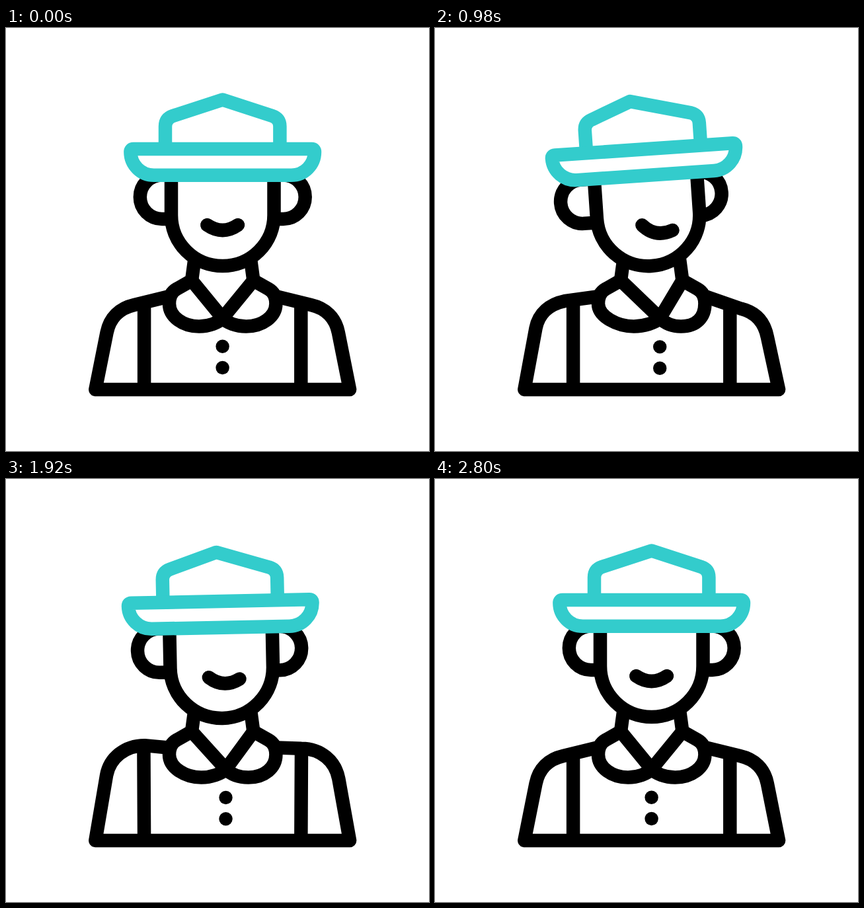
An HTML page that plays this animation: 640 by 640 pixels, repeating every 3.1 s.

```html
<!DOCTYPE html>
<html lang="en">
<head>
<meta charset="utf-8">
<title>Man in a hat</title>
<style>
html, body { margin: 0; height: 100%; overflow: hidden; background: #fff; }
svg { display: block; width: 100%; height: 100%; }
path, g { stroke-linejoin: round; }
</style>
</head>
<body>
<svg viewBox="0 0 640 640" fill="none" stroke="#000" stroke-width="20.5">
  <path id="body"/>
  <path id="straps"/>
  <path d="M286 345L281 382M369.4 345L374.4 382"/>
  <path id="collar"/>
  <g id="buttons" fill="#000" stroke="none">
    <circle cx="327.6" cy="481.7" r="10.2"/>
    <circle cx="327.6" cy="514" r="10.2"/>
  </g>
  <g id="head">
    <path id="earL" d="M256 289H236A33.2 33.2 0 0 1 236 222.6H256"/>
    <path id="earR" d="M399 289H419.5A33.2 33.2 0 0 0 419.5 222.6H399"/>
    <path fill="#fff" d="M250 215V283A77.75 77 0 0 0 405.5 283V215"/>
    <path id="smile" stroke-linecap="round" d="M304.3 298Q327.7 314 351 298"/>
    <g stroke="#33cccc" fill="#fff">
      <path id="crown"/>
      <path d="M192.9 183H462.5Q467 183 467 187.5A35.3 35.3 0 0 1 431.7 222.7H223.7A35.3 35.3 0 0 1 188.4 187.5Q188.4 183 192.9 183Z"/>
    </g>
  </g>
</svg>
<script>
const LOOP = 3100, MID = 327.7;
const $ = id => document.getElementById(id);
const set = (id, name, value) => $(id).setAttribute(name, value);

const smooth = (t, from, to) => {
  const u = Math.min(1, Math.max(0, (t - from) / (to - from)));
  return u * u * (3 - 2 * u);
};

// Ease with a long, soft landing: cubic-bezier(.33, 0, .15, 1)
function settle(t, from, to) {
  const x = Math.min(1, Math.max(0, (t - from) / (to - from)));
  let lo = 0, hi = 1;
  for (let i = 0; i < 24; i++) {
    const u = (lo + hi) / 2, v = 1 - u;
    if (.99 * v * v * u + .45 * v * u * u + u * u * u < x) lo = u; else hi = u;
  }
  return lo * lo * (3 - 2 * lo);
}

// side is -1 for left, 1 for right; x is the distance from the middle
const at = (side, x, y) => `${(MID + side * x).toFixed(2)} ${y.toFixed(2)} `;

function shoulder(side, lean, shrug) {
  const k = side * lean;
  return [
    at(side, 192.4, 547),
    at(side, 175.2 + .5 * shrug, 461 + 7 * k - 11.6 * shrug),
    at(side, 170.7, 438 + 7 * k - 16 * shrug),
    at(side, 155.7 - 9 * shrug + 2 * k, 424 + 6.5 * k - 21.5 * shrug),
    at(side, 133.7 - 17.5 * shrug + 2 * k, 419 + 6 * k - 15.7 * shrug),
    at(side, 82.5, 406.5)
  ];
}

function lobe(side, lean) {
  const tip = side * 13 * lean, low = side * 9 * lean;
  return "M" + at(side, 46.7, 382) + "L" + at(side, 69.7, 395) +
    "C" + at(side, 78.7, 400) + at(side, 80.7, 408) + at(side, 80.7, 417) +
    "C" + at(side, 80.7, 437) + at(side, 59.7 + low, 451.5) + at(side, 35.7 + low, 451.5) +
    "C" + at(side, 20 + low, 451.5) + at(side, 7 + tip, 446) + at(side, tip, 439) + "Z";
}

function strap(side, lean, shrug) {
  return "M" + at(side, 118.6 + .8 * shrug, 417 + 6 * side * lean - 10 * shrug) +
    "L" + at(side, 118.6, 547);
}

function draw(t) {
  const turn = settle(t, 0, 1240) - smooth(t, 1300, 2260);
  const lean = settle(t, 30, 1270) - smooth(t, 1450, 2260);
  const shrug = smooth(t, 1360, 2090) - smooth(t, 2090, 2800);

  const [a, b, c, d, e, f] = shoulder(-1, lean, shrug);
  const [A, B, C, D, E, F] = shoulder(1, lean, shrug);
  set("body", "d", `M${f}L${e}C${d}${c}${b}L${a}L${A}L${B}C${C}${D}${E}L${F}`);
  set("straps", "d", strap(-1, lean, shrug) + strap(1, lean, shrug));
  set("collar", "d", lobe(-1, lean) + lobe(1, lean));
  set("buttons", "transform", `translate(${13 * lean} ${.7 * lean})`);

  set("head", "transform", `translate(0 ${2.3 * shrug}) rotate(${-4 * turn} ${MID} 360)`);
  set("earL", "transform", `translate(${-6 * turn} 0)`);
  set("earR", "transform", `translate(${-12 * turn} 0)`);
  set("smile", "transform", `translate(${13 * turn} ${5 * turn}) rotate(${13.7 * turn} ${MID} 298)`);
  set("crown", "d", `M241 183V149Q241 137 252.5 133L${MID - 16 * turn} ${108.5 + turn}L402.9 133Q414.4 137 414.4 149V183`);
}

function frame(now) {
  draw(now % LOOP);
  requestAnimationFrame(frame);
}
draw(0);
requestAnimationFrame(frame);
</script>
</body>
</html>
```
